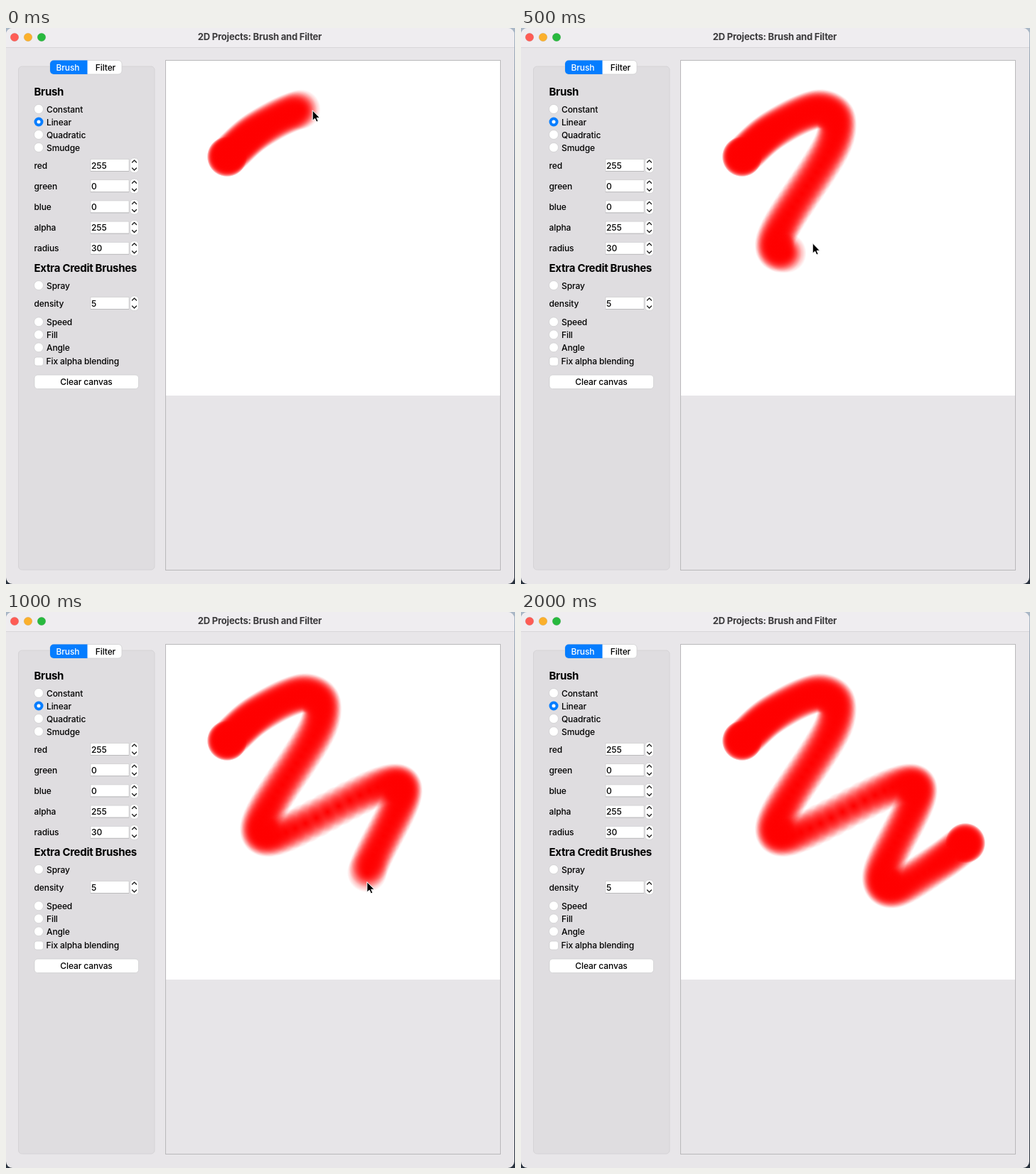
Recreate the animation shown at these times as an HTML page with a canvas. Size 716 by 782 pixels, loop 2080 ms.

```html
<!DOCTYPE html>
<html lang="en">
<head>
<meta charset="utf-8">
<title>Brush and Filter</title>
<style>
  html, body { margin: 0; width: 100%; height: 100%; overflow: hidden; }
  body { position: relative; background: linear-gradient(#a9b7c6, #5d6b7c 25%, #28313d); }
  svg, canvas { position: absolute; left: 0; top: 0; display: block; }
  #paper { left: 225px; top: 46px; }
  text { font: 450 12px Inter, "Open Sans", sans-serif; letter-spacing: -.1px; fill: #000; }
  .title { font-size: 13px; font-weight: 700; letter-spacing: -.2px; fill: #3b3a3c; }
  .head { font-size: 15px; font-weight: 700; letter-spacing: -.3px; }
  .mid { text-anchor: middle; }
  .control { fill: #fff; stroke: #cbcacc; stroke-width: .7; }
  .on { fill: #057dff; stroke: none; }
  .light { fill: #fff; }
  .chevron { fill: none; stroke: #222; stroke-width: 1.4; stroke-linecap: round; stroke-linejoin: round; }
</style>
</head>
<body>
<svg width="716" height="782" viewBox="0 0 716 782">
  <rect width="715" height="782" rx="9" fill="#e8e6e9"/>
  <path d="M0 27V9a9 9 0 0 1 9-9H706a9 9 0 0 1 9 9V27Z" fill="#efedf0"/>
  <path d="M0 27.5H715" stroke="#d8d6d9"/>
  <g stroke="#000" stroke-opacity=".12" stroke-width=".6">
    <circle cx="12" cy="13" r="5.8" fill="#fe5c55"/>
    <circle cx="31" cy="13" r="5.8" fill="#fbb02c"/>
    <circle cx="50" cy="13" r="5.8" fill="#28b93e"/>
  </g>
  <text class="title mid" x="357" y="17">2D Projects: Brush and Filter</text>

  <rect x="17.5" y="54" width="191.5" height="708" rx="5" fill="#dfdde0" stroke="#d5d3d6"/>
  <rect class="control" x="62" y="45.5" width="101" height="19.5" rx="5"/>
  <path class="on" d="M114.5 45.5H67a5 5 0 0 0-5 5V60a5 5 0 0 0 5 5H114.5Z"/>
  <text class="mid light" x="87" y="60">Brush</text>
  <text class="mid" x="140" y="60">Filter</text>

  <g id="controls"></g>
  <text class="head" x="39.5" y="95.3">Brush</text>
  <text class="head" x="39.5" y="343">Extra Credit Brushes</text>
  <rect class="control" x="40" y="463" width="12.5" height="12" rx="3"/>
  <text x="56.5" y="473.4">Fix alpha blending</text>
  <rect class="control" x="40" y="488" width="146.5" height="19.5" rx="4.5"/>
  <text class="mid" x="113" y="502">Clear canvas</text>

  <rect x="224.5" y="45.5" width="471" height="717" fill="#e7e5e8" stroke="#b9b8ba"/>
</svg>
<canvas id="paper" width="470" height="471"></canvas>
<svg width="716" height="782" viewBox="0 0 716 782">
  <path id="cursor" d="M0 0V14.5L3.4 11.5 5.6 16.4 8 15.3 5.9 10.6H10.3Z" stroke="#fff"/>
</svg>
<script>
const LOOP = 2080, STEP = 250 / 3;
const RADIUS = 28.2;   // brush radius on the scaled canvas
const SAMPLE = 16;     // ms between dabs
const LEAD = 40;       // ms the pointer runs ahead of the paint

const radio = (label, y, on) => `
  <circle class="control ${on ? 'on' : ''}" cx="46" cy="${y}" r="6.5"/>
  ${on ? `<circle class="light" cx="46" cy="${y}" r="2.5"/>` : ''}
  <text x="57" y="${y + 4.5}">${label}</text>`;

const spinner = (label, value, y) => `
  <text x="39.5" y="${y + 4.5}">${label}</text>
  <rect class="control" x="119" y="${y - 8.5}" width="54" height="17"/>
  <path d="M119 ${y + 8.5}h54" stroke="#b5b4b6" stroke-width=".8"/>
  <text x="120" y="${y + 4.5}">${value}</text>
  <rect class="control" x="174.5" y="${y - 10}" width="12" height="20.5" rx="5"/>
  <path class="chevron" d="M177.5 ${y - 4}l3-3 3 3M177.5 ${y + 4}l3 3 3-3"/>`;

const rows = (items, y, gap, make) => items.map((item, i) => make(item, y + gap * i)).join('');

document.getElementById('controls').innerHTML =
  rows(['Constant', 'Linear', 'Quadratic', 'Smudge'], 114, 18, (s, y) => radio(s, y, s === 'Linear')) +
  rows(['red 255', 'green 0', 'blue 0', 'alpha 255', 'radius 30'], 193, 29.2,
    (s, y) => spinner(...s.split(' '), y)) +
  radio('Spray', 362) + spinner('density', 5, 387) +
  rows(['Speed', 'Fill', 'Angle'], 413.3, 18, (s, y) => radio(s, y));

// Bends of the zigzag: time, x, y
const route = [
  [-440, 311, 181], [-200, 355, 143], [0, 417, 114], [85, 443, 126], [170, 437, 166],
  [390, 359, 294], [500, 380, 315], [670, 527, 245], [790, 558, 255],
  [1000, 508, 366], [1120, 525, 389], [1250, 587, 353], [1350, 625, 325]
];
const first = route[0], last = route[route.length - 1];

function slope(i, axis) {
  const a = route[i - 1] || first, b = route[i + 1] || last;
  return (b[axis] - a[axis]) / (b[0] - a[0]);
}

// Smooth curve through the bends
function pointAt(t) {
  if (t <= first[0]) return first.slice(1);
  if (t >= last[0]) return last.slice(1);
  const j = route.findIndex(p => p[0] > t), i = j - 1, a = route[i], b = route[j];
  const d = b[0] - a[0], u = (t - a[0]) / d, v = 1 - u;
  return [1, 2].map(k =>
    v * v * (1 + 2 * u) * a[k] + u * u * (3 - 2 * u) * b[k] +
    d * u * v * (v * slope(i, k) - u * slope(j, k)));
}

const ctx = document.getElementById('paper').getContext('2d');
const cursor = document.getElementById('cursor');

function dab(x, y) {
  const g = ctx.createRadialGradient(x, y, 0, x, y, RADIUS);
  g.addColorStop(0, 'rgba(255,0,0,1)');
  g.addColorStop(1, 'rgba(255,0,0,0)');
  ctx.fillStyle = g;
  ctx.fillRect(x - RADIUS, y - RADIUS, 2 * RADIUS, 2 * RADIUS);
}

function draw(t) {
  ctx.fillStyle = '#fff';
  ctx.fillRect(0, 0, 470, 471);
  // The brush rests a moment at both ends, which hardens the edge there
  const end = Math.min(t, last[0] + 8 * SAMPLE);
  for (let s = first[0] - 8 * SAMPLE; s <= end; s += SAMPLE) {
    const [x, y] = pointAt(s);
    dab(x - 225, y - 46);
  }
  const [x, y] = pointAt(t + LEAD);
  cursor.setAttribute('transform', `translate(${x} ${y})`);
  cursor.style.display = t < 1830 ? '' : 'none';
}

// The picture advances twelve times a second, on 10 ms ticks
const tick = k => Math.round(k * STEP / 10) * 10;
function poseTime(t) {
  const k = Math.floor(t / STEP + .1);
  return tick(k) > t ? tick(k - 1) : tick(k);
}

const start = performance.now();
let shown = -1;
function loop() {
  const t = poseTime((performance.now() - start) % LOOP);
  if (t !== shown) draw(shown = t);
  requestAnimationFrame(loop);
}
loop();
</script>
</body>
</html>
```
